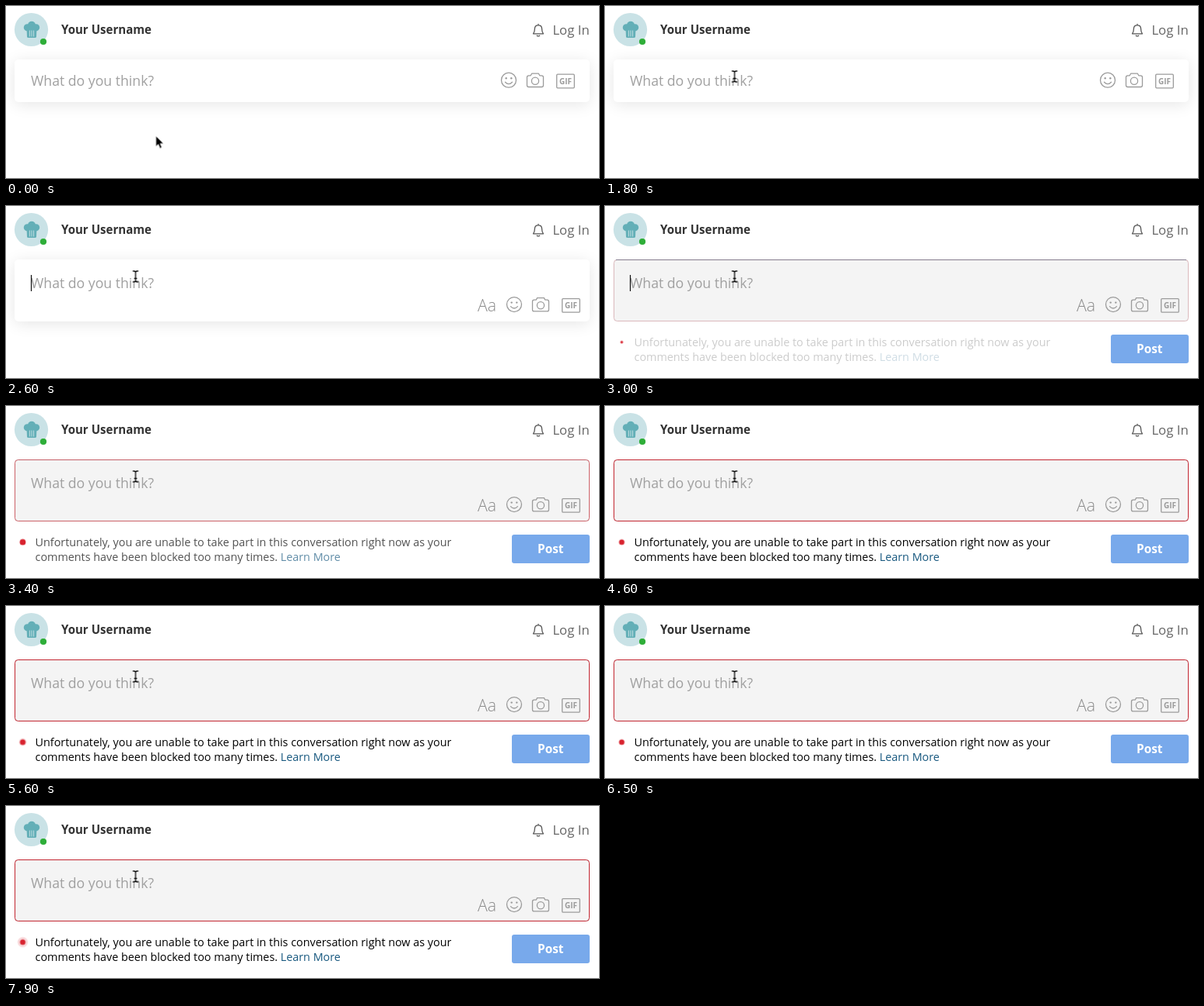
An HTML page that plays this animation: 762 by 222 pixels, repeating every 8000 ms.

```html
<!DOCTYPE html>
<html lang="en">
<head>
<meta charset="utf-8">
<title>Comment box</title>
<style>
  html, body { margin: 0; width: 762px; height: 222px; overflow: hidden; background: #fff; }
  .card, svg { position: absolute; }
  .card {
    left: 11px; top: 69px; width: 739px; height: 55px; border-radius: 5px; background: #fff;
    animation: grow 8s linear infinite, shadow 8s step-end infinite;
  }
  svg { left: 0; top: 0; font-family: "Open Sans", sans-serif; }
  .line { fill: none; stroke: #9b9b9b; stroke-width: 1.3; stroke-linecap: round; stroke-linejoin: round; }
  .bold { font-weight: 700; }

  /* hard switches */
  .aa, .caret, .blocked, .arrow, .beam { animation: 8s step-end infinite; }
  .aa { animation-name: showAa; }
  .caret { animation-name: caret; }
  .blocked { animation-name: blocked; }
  .arrow { animation-name: arrow; }
  .beam { animation-name: beam; }

  /* smooth motion */
  .hint, .tools, .message, .focus, .dot, .halo, .pointer { animation: 8s linear infinite; }
  .hint { animation-name: hint; }
  .tools { animation-name: tools; }
  .message { animation-name: fade; }
  .focus { animation-name: focus; }
  .dot { animation-name: dot; }
  .halo { animation-name: halo; }
  .pointer { animation-name: pointer; }

  @keyframes grow { 0%, 30% { height: 55px; } 32.5%, 100% { height: 80px; } }
  @keyframes shadow { 0% { box-shadow: 0 3px 20px rgba(0, 0, 0, .1); } 35%, 100% { box-shadow: none; } }
  @keyframes hint { 0%, 30% { transform: none; } 32.5%, 100% { transform: translateY(3px); } }
  @keyframes tools { 0%, 30% { transform: none; } 32.5%, 100% { transform: translate(7px, 31.4px); } }
  @keyframes showAa { 0% { opacity: 0; } 32.5%, 100% { opacity: 1; } }
  @keyframes caret { 0% { opacity: 0; } 30% { opacity: 1; } 38.75%, 100% { opacity: 0; } }
  @keyframes blocked { 0% { opacity: 0; } 35%, 100% { opacity: 1; } }
  @keyframes fade {
    0%, 35% { opacity: 0; } 37.5% { opacity: .2; } 42.5% { opacity: .68; } 48.75%, 100% { opacity: 1; }
  }
  @keyframes focus { 0%, 37.5% { opacity: .6; } 43%, 100% { opacity: 0; } }
  @keyframes dot {
    0%, 35% { transform: scale(0); } 37.5% { transform: scale(.5); }
    41.25% { transform: scale(1.15); } 45%, 100% { transform: scale(1); }
  }
  @keyframes halo {
    0%, 43.74% { transform: scale(.5); opacity: 0; }
    43.75% { transform: scale(.5); opacity: .35; }
    52.5% { transform: scale(1); opacity: 0; }
    67.49% { transform: scale(.5); opacity: 0; }
    67.5% { transform: scale(.5); opacity: .35; }
    76.25% { transform: scale(1); opacity: 0; }
    92.49% { transform: scale(.5); opacity: 0; }
    92.5% { transform: scale(.5); opacity: .35; }
    100% { transform: scale(1); opacity: .14; }
  }
  @keyframes pointer {
    0%, 2.5% { transform: translate(192.5px, 167.5px); }
    5% { transform: translate(204px, 172px); }
    8.75%, 16.875% { transform: translate(179px, 164px); }
    18.75% { transform: translate(176px, 148px); }
    20% { transform: translate(171px, 115px); }
    21.875%, 100% { transform: translate(166.5px, 91px); }
  }
  @keyframes arrow { 0% { opacity: 1; } 20%, 100% { opacity: 0; } }
  @keyframes beam { 0% { opacity: 0; } 20%, 100% { opacity: 1; } }
</style>
</head>
<body>
<div class="card"></div>
<svg width="762" height="222" viewBox="0 0 762 222">
  <defs>
    <path id="ibeam" d="M-3.5 -7H-2Q0 -7 0 -5Q0 -7 2 -7H3.5M0 -5V5M-3.5 7H-2Q0 7 0 5Q0 7 2 7H3.5M-1.8 2.5H1.8"/>
  </defs>

  <!-- header -->
  <circle cx="32.5" cy="30.5" r="21.6" fill="#c9e2e6"/>
  <g fill="#63afb7">
    <circle cx="27.4" cy="27.8" r="4.6"/>
    <circle cx="33" cy="24.8" r="5"/>
    <circle cx="38.6" cy="27.8" r="4.6"/>
    <path d="M26.5 27H39.5L39 39.5Q38.8 41 37.3 41H28.7Q27.2 41 27 39.5Z"/>
  </g>
  <path d="M30.4 31.5V39.5M33 31.5V39.5M35.6 31.5V39.5" stroke="#c9e2e6" stroke-width=".9"/>
  <circle cx="48" cy="46" r="4.1" fill="#2eae38"/>
  <text class="bold" x="71" y="36" font-size="15.07" fill="#333">Your Username</text>
  <path class="line" style="stroke:#555" d="M677.5 35.8H690.5C689 34 688.6 32.8 688.6 29.6C688.6 26.4 686.8 24.8 684 24.8S679.4 26.4 679.4 29.6C679.4 32.8 679 34 677.5 35.8ZM684 24.6V23.4M682.3 38.2Q684 39.6 685.7 38.2"/>
  <text x="702.4" y="37" font-size="16.8" fill="#666">Log In</text>

  <!-- blocked field -->
  <g class="blocked">
    <rect x="11.5" y="69.5" width="738" height="79" rx="4" fill="#f4f4f4" stroke="#e2dfe0"/>
    <rect class="message" x="11.5" y="69.5" width="738" height="79" rx="4" fill="none" stroke="#c22630"/>
    <path class="focus" d="M14 69.5H747" stroke="#4d5570"/>
    <rect x="650" y="166" width="100" height="37" rx="3" fill="#78a9eb"/>
    <text class="bold" x="699.8" y="190" font-size="15.4" fill="#fff" text-anchor="middle">Post</text>
  </g>

  <text class="hint" x="32" y="103" font-size="17.65" fill="#a0a0a0">What do you think?</text>
  <path class="caret" d="M32.5 89V110" stroke="#111" stroke-width="1.2"/>
  <text class="aa" x="606" y="135.7" font-size="21.4" font-weight="300" fill="#8c8c8c">Aa</text>
  <g class="tools">
    <g class="line">
      <circle cx="646" cy="95.7" r="9.5"/>
      <path d="M641.5 98.2Q646 103 650.5 98.2"/>
      <path d="M671.7 89.8H674.2L675.6 87.2H684.4L685.8 89.8H688.3Q690.5 89.8 690.5 92V102.3Q690.5 104.5 688.3 104.5H671.7Q669.5 104.5 669.5 102.3V92Q669.5 89.8 671.7 89.8Z"/>
      <circle cx="680" cy="96.8" r="4.6"/>
      <rect x="707.7" y="88.2" width="22.6" height="17.6" rx="1.2"/>
    </g>
    <g fill="#9b9b9b">
      <circle cx="642.7" cy="93.2" r="1.2"/>
      <circle cx="649.3" cy="93.2" r="1.2"/>
      <text class="bold" x="719" y="100.7" font-size="10" text-anchor="middle">GIF</text>
    </g>
  </g>

  <!-- notice -->
  <g transform="translate(21.5 175.7)" fill="#d8232f">
    <circle class="halo" r="7.2"/>
    <circle class="dot" r="3.5"/>
  </g>
  <g class="message" font-size="14.35">
    <text x="37.6" y="181">Unfortunately, you are unable to take part in this conversation right now as your</text>
    <text x="37.6" y="200">comments have been blocked too many times. <tspan fill="#17587f">Learn More</tspan></text>
  </g>

  <g class="pointer">
    <path class="arrow" d="M0 0V14.2L3.2 11.2L5.4 16.4L8 15.3L5.8 10.2H10.2Z" stroke="#fff"/>
    <g class="beam" fill="none">
      <use href="#ibeam" stroke="#fff" stroke-opacity=".7" stroke-width="2.4"/>
      <use href="#ibeam" stroke="#000" stroke-width="1.3"/>
    </g>
  </g>
</svg>
</body>
</html>
```
